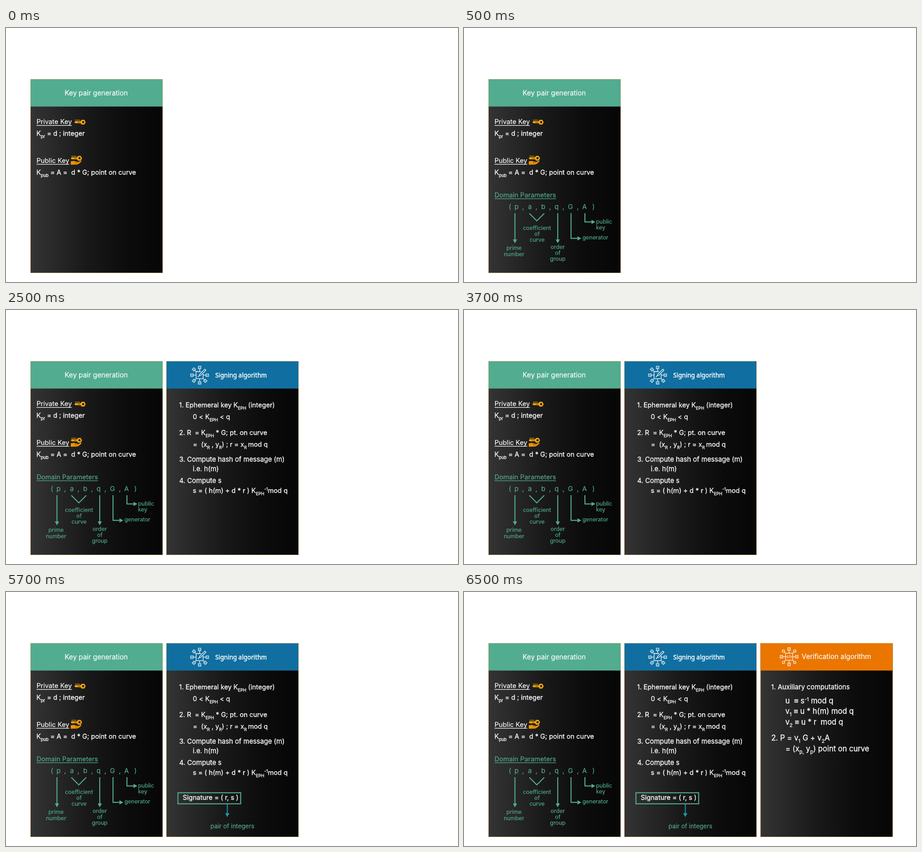
Write an HTML page with a canvas that moves like this. It is 998 px wide and 561 px high and loops after 8000 ms.

```html
<!DOCTYPE html>
<html lang="en">
<head>
<meta charset="utf-8">
<title>Digital signature steps</title>
<style>
  html, body { margin: 0; width: 100%; height: 100%; overflow: hidden; background: #fff; }
  canvas { display: block; }
</style>
</head>
<body>
<canvas id="stage" width="998" height="561"></canvas>
<script>
const ctx = document.getElementById('stage').getContext('2d');
const LOOP = 8000;
const WHITE = '#fff', GREEN = '#52ac90', BLUE = '#106fa0', ORANGE = '#ea7600';
const TEAL = '#1f9bb3', GOLD = '#f5a70d', AMBER = '#f29200';

function setFont(size, weight = 400, family = 'Inter') {
  ctx.font = `${weight} ${size}px ${family}, sans-serif`;
}

// Fill text and thicken it slightly with a hairline
function ink(str, x, y, color, weight) {
  ctx.fillStyle = ctx.strokeStyle = color;
  ctx.lineWidth = weight;
  ctx.fillText(str, x, y);
  ctx.strokeText(str, x, y);
}

function text(str, x, y, size, color = WHITE, align = 'left') {
  setFont(size);
  ctx.textAlign = align;
  ink(str, x, y, color, 0.15);
}

// Text with _{subscript} and ^{superscript} parts
function formula(str, x, y, size = 14.6, small = 9.3) {
  ctx.textAlign = 'left';
  for (const part of str.split(/([_^]\{.*?\})/)) {
    const shifted = /^[_^]\{/.test(part);
    const run = shifted ? part.slice(2, -1) : part;
    setFont(shifted ? small : size);
    ink(run, x, y + (!shifted ? 0 : part[0] === '_' ? 5 : -5), WHITE, 0.3);
    x += ctx.measureText(run).width;
  }
}

function underlined(str, x, y, color) {
  text(str, x, y, 14.65, color);
  ctx.fillRect(x, y + 2.3, ctx.measureText(str).width, 1.3);
}

function label(lines, x, y, step, align = 'center') {
  lines.forEach((line, i) => text(line, x, y + i * step, 12.4, GREEN, align));
}

function path(points, close) {
  ctx.beginPath();
  points.forEach(([x, y]) => ctx.lineTo(x, y));
  if (close) ctx.closePath();
}

function line(points, color, width) {
  path(points);
  ctx.strokeStyle = color;
  ctx.lineWidth = width;
  ctx.stroke();
}

function arrow(points, color = GREEN, width = 2.2) {
  const [[px, py], [x, y]] = points.slice(-2);
  const len = Math.hypot(x - px, y - py);
  const ux = (x - px) / len, uy = (y - py) / len;
  const bx = x - ux * 8.5, by = y - uy * 8.5;
  line([...points.slice(0, -1), [bx, by]], color, width);
  path([[x, y], [bx - uy * 4.6, by + ux * 4.6], [bx + uy * 4.6, by - ux * 4.6]], true);
  ctx.fillStyle = color;
  ctx.fill();
}

function panel(x, color) {
  const top = 113, w = 292, h = 428;
  const shade = ctx.createLinearGradient(x, 0, x + w, 0);
  shade.addColorStop(0, '#343434');
  shade.addColorStop(0.42, '#191919');
  shade.addColorStop(0.72, '#0c0c0c');
  shade.addColorStop(1, '#060606');
  ctx.fillStyle = shade;
  ctx.fillRect(x, top, w, h);
  ctx.fillStyle = color;
  ctx.fillRect(x, top, w, 60.5);
  ctx.strokeStyle = '#c58a1c';
  ctx.lineWidth = 1;
  ctx.setLineDash([1, 1]);
  ctx.strokeRect(x + 0.5, top + 0.5, w - 1, h - 1);
  ctx.setLineDash([]);
}

function keyIcon(x, y) {
  ctx.save();
  ctx.translate(x, y);
  ctx.fillStyle = GOLD;
  path([[0, 6], [2, 3.8], [14, 3.8], [14, 8.3], [2, 8.3]], true);
  ctx.fill();
  for (let i = 0; i < 4; i++) {
    ctx.beginPath();
    ctx.arc(2.6 + i * 2.8, 1.6, 1, 0, 7);
    ctx.fill();
  }
  line([[7, 6.2], [14, 6.2]], '#3a2a08', 0.9);
  path([[12.7, 6], [15.8, 0.7], [21.9, 0.7], [25, 6], [21.9, 11.3], [15.8, 11.3]], true);
  ctx.fillStyle = GOLD;
  ctx.fill();
  ctx.beginPath();
  ctx.arc(19.3, 6, 2.4, 0, 7);
  ctx.fillStyle = '#1c1c1c';
  ctx.fill();
  ctx.restore();
}

function handIcon(x, y) {
  ctx.save();
  ctx.translate(x, y);
  ctx.fillStyle = AMBER;
  ctx.beginPath();
  ctx.moveTo(0, 2);
  ctx.lineTo(5, 1.2);
  ctx.quadraticCurveTo(8, 0.2, 10.5, 2.4);
  ctx.lineTo(14.2, 2.6);
  ctx.quadraticCurveTo(15.8, 3.6, 14, 4.8);
  ctx.lineTo(21.5, 1);
  ctx.quadraticCurveTo(24.8, 0, 23.6, 2.2);
  ctx.quadraticCurveTo(19, 7.4, 14.5, 9);
  ctx.lineTo(0, 9.6);
  ctx.fill();
  line([[9, 5.4], [14, 5.2]], '#3a2a08', 0.7);
  ctx.restore();
}

function node(x, y, shape) {
  ctx.beginPath();
  if (shape === 'circle') {
    ctx.arc(x, y, 2.6, 0, 7);
  } else if (shape === 'diamond') {
    path([[x, y - 3.8], [x + 3.8, y], [x, y + 3.8], [x - 3.8, y]], true);
  } else {
    ctx.rect(x - 2.8, y - 2.8, 5.6, 5.6);
  }
  ctx.stroke();
  if (shape !== 'circle') ctx.fillRect(x - 0.8, y - 0.8, 1.6, 1.6);
}

// Chip with eight connected nodes; pen or code mark inside
function chipIcon(cx, cy, pen) {
  const r = 7.8;
  ctx.save();
  ctx.translate(cx, cy);
  ctx.strokeStyle = ctx.fillStyle = WHITE;
  ctx.lineWidth = 1.2;
  for (let i = 0; i < 4; i++) {
    const a = i * Math.PI / 2, c = Math.round(Math.cos(a)), s = Math.round(Math.sin(a));
    node(c * 17, s * 17);
    line([[c * r, s * r], [c * 14.2, s * 14.2]], WHITE, 1.2);
    const dx = c - s, dy = s + c;
    if (pen && dx > 0 && dy < 0) continue;
    node(dx * 12.6, dy * 12.6, pen ? 'diamond' : 'circle');
    line([[dx * r, dy * r], [dx * 10.7, dy * 10.7]], WHITE, 1.2);
  }
  if (pen) {
    line([[3, -r], [-r, -r], [-r, r], [r, r], [r, -3]], WHITE, 1.3);
    path([[-1, 1.4], [0.4, -2.2], [11.5, -13.2], [14, -10.8], [2.8, 0.2]], true);
    ctx.stroke();
    line([[-4, 4.2], [-1, 1.4]], WHITE, 1.2);
  } else {
    ctx.strokeRect(-r, -r, 2 * r, 2 * r);
    line([[-2.8, -2.6], [-5.4, 0], [-2.8, 2.6]], WHITE, 1.1);
    line([[2.8, -2.6], [5.4, 0], [2.8, 2.6]], WHITE, 1.1);
    line([[1.1, -3.4], [-1.1, 3.4]], WHITE, 1.1);
  }
  ctx.restore();
}

function keyPair() {
  panel(54, GREEN);
  text('Key pair generation', 199.3, 149, 15.2, WHITE, 'center');
  underlined('Private Key', 67.4, 212.3, WHITE);
  keyIcon(151, 202);
  formula('K_{pr} = d ; integer', 67.3, 238);
  underlined('Public Key', 67.4, 298, WHITE);
  keyIcon(143, 281.7);
  handIcon(143, 292.5);
  formula('K_{pub} = A =  d * G; point on curve', 67.3, 323.6);
}

function domain() {
  underlined('Domain Parameters', 67.4, 374.2, GREEN);
  const at = [101.5, 116, 130.5, 145.5, 160, 175, 190, 204.5, 219.5, 235, 251.5, 266, 286];
  [...'(p,a,b,q,G,A)'].forEach((ch, i) => text(ch, at[i], 400, 14.8, GREEN, 'center'));
  arrow([[112.5, 409], [112.5, 475.5]]);
  line([[144.3, 409.5], [160.7, 426], [177.2, 409.5]], GREEN, 2.2);
  arrow([[207, 409], [207, 475.5]]);
  arrow([[236.3, 409], [236.3, 464.7], [259, 464.7]]);
  arrow([[267, 409], [267, 428.3], [290, 428.3]]);
  label(['prime', 'number'], 110.5, 489.8, 14);
  label(['coefficient', 'of', 'curve'], 161.3, 445.6, 13.4);
  label(['order', 'of', 'group'], 207, 488, 13.2);
  label(['public', 'key'], 291.5, 432.3, 12.7, 'left');
  label(['generator'], 261.5, 467, 0, 'left');
}

function signing() {
  panel(354, BLUE);
  chipIcon(427.5, 143.8, true);
  setFont(13.55, 400, '"Noto Sans"');
  ctx.textAlign = 'left';
  ink('Signing algorithm', 462, 148.7, WHITE, 0.45);
  formula('1. Ephemeral key K_{EPH} (integer)', 382.3, 215);
  formula('0 < K_{EPH} < q', 412.6, 241);
  formula('2. R  = K_{EPH} * G; pt. on curve', 382.3, 275.8);
  formula('=  (x_{R} , y_{R}) ; r = x_{R }mod q', 412.8, 301.8);
  formula('3. Compute hash of message (m)', 382.5, 335.2, 14.8);
  formula('i.e. h(m)', 412.4, 356.2, 14.8);
  formula('4. Compute s', 382.5, 382, 14.8);
  formula('s = ( h(m) + d * r ) K_{EPH}^{-1}mod q', 412.6, 404.2, 14.7);
}

function signature() {
  ctx.strokeStyle = GREEN;
  ctx.lineWidth = 2.2;
  ctx.strokeRect(379.6, 443.4, 138.6, 24.4);
  formula('Signature = ( r, s )', 390.3, 459);
  arrow([[488.6, 469], [488.6, 497]], TEAL, 2);
  text('pair of integers', 500, 521.7, 13.5, GREEN, 'center');
}

function verification() {
  panel(654.6, ORANGE);
  chipIcon(717.8, 143, false);
  text('Verification algorithm', 745.6, 148.2, 15.2);
  formula('1. Auxiliary computations', 678.3, 215, 14.75);
  const rows = [
    ['u  ≡ s^{-1} mod q', 709.5, 245.5],
    ['v_{1} ≡ u * h(m) mod q', 709.5, 269],
    ['v_{2} ≡ u * r  mod q', 709.5, 293],
    ['2. P = v_{1} G + v_{2}A', 678.5, 328],
    ['= (x_{p,} y_{p}) point on curve', 709.7, 352]
  ];
  rows.forEach(([str, x, y]) => formula(str, x, y, 16.6, 11));
}

const scenes = [[0, keyPair], [500, domain], [2500, signing], [4500, signature], [6500, verification]];
const start = performance.now();

function draw() {
  const t = (performance.now() - start) % LOOP;
  ctx.lineJoin = 'miter';
  ctx.miterLimit = 3;
  ctx.fillStyle = WHITE;
  ctx.fillRect(0, 0, 998, 561);
  for (const [from, scene] of scenes) if (t >= from) scene();
  requestAnimationFrame(draw);
}
draw();
</script>
</body>
</html>
```
